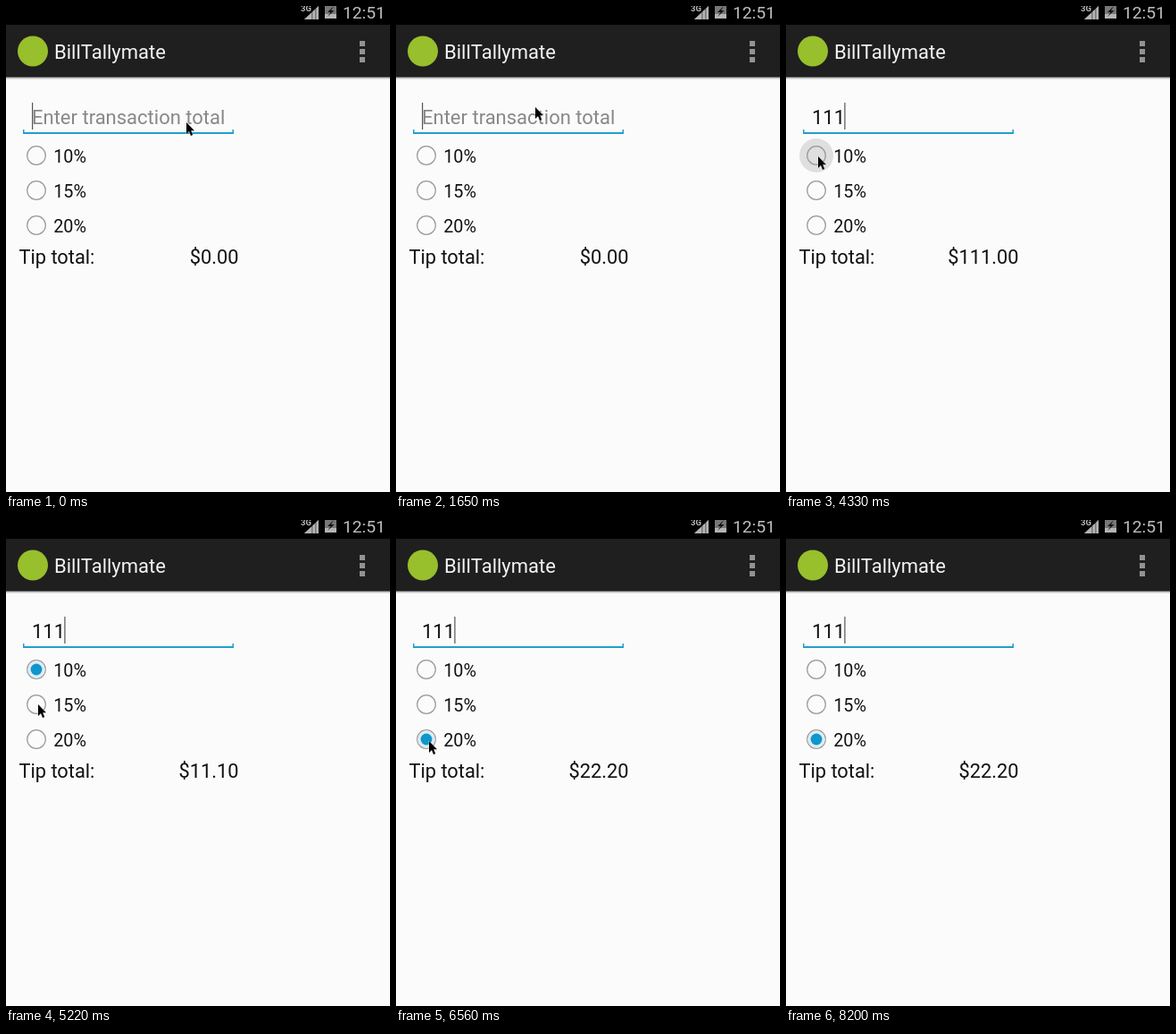
Write an HTML page that moves like this. It is 430 px wide and 543 px high and loops after 8.49 s.

```html
<!DOCTYPE html>
<html lang="en">
<head>
<meta charset="utf-8">
<title>BillTallymate</title>
<style>
  html, body { margin: 0; width: 100%; height: 100%; overflow: hidden; background: #fbfbfb; }
  svg { display: block; width: 430px; height: 543px; font: 22px Roboto, sans-serif; }
  .label { font-size: 19.8px; }
  .total { font-size: 21.8px; }
  .ring { fill: none; stroke: #999; stroke-width: 1.2; }
</style>
</head>
<body>
<svg viewBox="0 0 430 543">
  <defs>
    <linearGradient id="shade" x2="0" y2="1">
      <stop stop-color="#aaa"/><stop offset="1" stop-color="#fbfbfb"/>
    </linearGradient>
  </defs>
  <rect width="430" height="543" fill="#fbfbfb"/>

  <rect width="430" height="22" fill="#000"/>
  <path d="M350 0V15H334Z" fill="#777"/>
  <path d="M342 7.5V15H334ZM343.5 6V15H346V4ZM347.5 2.5V15H350V0Z" fill="#b4b4b4"/>
  <text x="330" y="6" font-size="9.5" font-weight="700" fill="#bbb">3G</text>
  <path d="M357 0H370V14H357Z" fill="#777"/>
  <path d="M357 9H370V14H357Z" fill="#b4b4b4"/>
  <path d="M367 0L360 7H363.5L360 12L367.5 5H364Z" fill="#111"/>
  <text x="377" y="13.5" font-size="19.2" fill="#bdbdbd">12:51</text>

  <rect y="21" width="430" height="59" fill="#1f1f1f"/>
  <rect y="79.5" width="430" height="3" fill="url(#shade)"/>
  <circle cx="30" cy="50.5" r="17" fill="#98bf2c"/>
  <text x="54" y="59" fill="#f3f3f3">BillTallymate</text>
  <path d="M399 39V45M399 48V54M399 57V63" stroke="#929292" stroke-width="6"/>

  <text id="hint" x="29" y="132" fill="#888">Enter transaction total</text>
  <text id="entry" x="29" y="132" fill="#111"></text>
  <path d="M19 138H20.5V141H253.5V138H255V143H19Z" fill="#219fcb"/>
  <rect id="caret" y="108" width="1.2" height="30" fill="#555"/>
  <g id="radios"></g>
  <text class="total" x="14.5" y="288" fill="#111">Tip total:</text>
  <text class="total" id="tip" x="260.5" y="288" text-anchor="end" fill="#111"></text>
  <path id="pointer" d="M0 0V13L3 10L5 15L7.2 14L5.2 9.2H9Z"
        fill="#000" stroke="#fff" stroke-width=".6" paint-order="stroke"/>
</svg>
<script>
const LOOP = 8490, TICKS = 57; // the screen refreshes once per tick
const RATES = [10, 15, 20];
const KEYS = [15, 19, 22];     // ticks at which a "1" is typed
const TAPS = [29, 37, 42];     // ticks at which each rate is pressed
const GLIDES = [               // pointer moves: from tick, to tick, x, y
  [0, 4, 165, 502], [4, 6, 160, 456], [7, 11, 156, 113], [23, 27, 36, 168],
  [31, 33, 36, 206], [38, 41, 37, 247], [44, 52, 379, 560]
];

const $ = id => document.getElementById(id);
const show = (el, on) => el.setAttribute('visibility', on ? 'visible' : 'hidden');
const passed = (ticks, now) => ticks.filter(t => t <= now).length;

$('radios').innerHTML = RATES.map((rate, i) => {
  const y = 167 + 39 * i;
  return `<circle class="halo" cx="34" cy="${y}" r="19" fill="#dfdfdf"/>
    <circle class="ring" cx="34" cy="${y}" r="10.3"/>
    <g class="dot"><circle cx="34" cy="${y}" r="9.7" fill="#dcecf5"/>
    <circle cx="34" cy="${y}" r="6.4" fill="#0f96cb"/></g>
    <text class="label" x="53.2" y="${y + 7.5}" fill="#111">${rate}%</text>`;
}).join('');
const halos = document.querySelectorAll('.halo');
const dots = document.querySelectorAll('.dot');

function pointerAt(tick) {
  let x = 202, y = 130;
  for (const [from, to, endX, endY] of GLIDES) {
    const p = Math.min(1, Math.max(0, (tick - from) / (to - from)));
    const ease = p * p * (3 - 2 * p);
    x += (endX - x) * ease;
    y += (endY - y) * ease;
  }
  return [x, y];
}

// Blinks every second, stays lit while typing, then blinks with a new phase.
function caretOn(tick) {
  if (tick >= KEYS[0] && tick < KEYS[2]) return true;
  const phase = tick < KEYS[0] ? 630 : 190;
  return (tick * LOOP / TICKS - phase + 1000) % 1000 < 500;
}

// The total follows a key by one tick and a tap by two.
function total(tick) {
  const amount = Number('1'.repeat(passed(KEYS, tick - 1)));
  const taps = passed(TAPS, tick - 2);
  return taps ? amount * RATES[taps - 1] / 100 : amount;
}

function draw(tick) {
  const typed = passed(KEYS, tick);
  const chosen = passed(TAPS, tick - 1) - 1;
  show($('hint'), !typed);
  $('entry').textContent = '1'.repeat(typed);
  $('caret').setAttribute('x', 29 + 12.1 * typed);
  show($('caret'), caretOn(tick));
  $('tip').textContent = '$' + total(tick).toFixed(2);
  halos.forEach((el, i) => show(el, tick >= TAPS[i] && tick < TAPS[i] + 2));
  dots.forEach((el, i) => show(el, i === chosen));
  $('pointer').setAttribute('transform', `translate(${pointerAt(tick)})`);
}

const start = performance.now();
function frame() {
  const t = (performance.now() - start) % LOOP;
  draw(Math.floor(t / LOOP * TICKS));
  requestAnimationFrame(frame);
}
frame();
</script>
</body>
</html>
```
